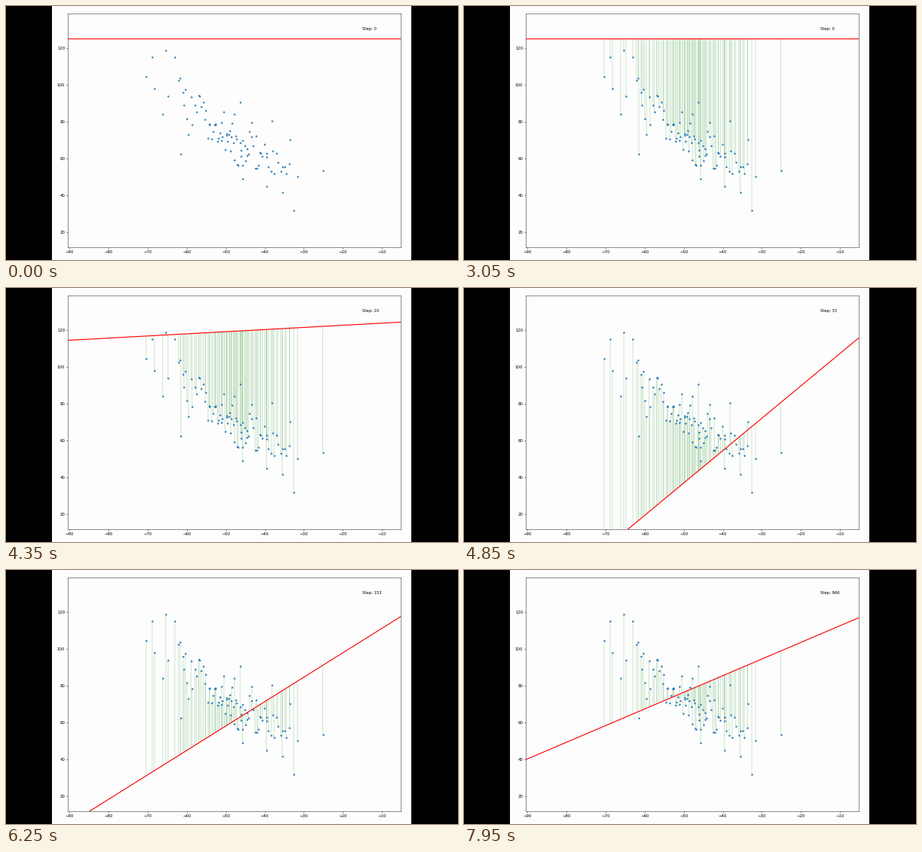
A matplotlib script for the animation above (8000 ms loop, 600 px wide and 338 px high).

```python
import numpy as np
import matplotlib.pyplot as plt
from matplotlib.animation import FuncAnimation
from matplotlib.collections import LineCollection
from matplotlib.patches import Rectangle

W, H, DPI = 600, 338, 100
FRAMES, INTERVAL = 160, 50
LEFT, RIGHT, TOP, BOTTOM = 82.1, 524.0, 10.2, 321.0
PX = 72 / DPI  # points per pixel

plt.rcParams["font.family"] = "DejaVu Sans"


def to_x(px):
    return -90 + (px - 84.2) / 5.186


def to_y(py):
    return 120 - (py - 56.0) / 2.446


def make_points(count=100):
    """A falling cloud, dense in the middle, with a few fixed outliers."""
    outliers = np.array([
        (212, 59), (194, 68.5), (224, 67.5), (186, 94), (197, 110),
        (215, 120.5), (208, 144), (238, 111), (232, 196.5), (311, 128.5),
        (353, 153.5), (314, 230), (345.5, 240), (366.5, 248), (382, 272),
        (387, 226.5), (376.5, 178.5), (420.5, 218.5),
    ])
    rng = np.random.default_rng(4)
    u = np.linspace(-1, 1, count - len(outliers))
    px = 302 + 48 * u + 26 * u ** 3 + rng.uniform(-1, 1, len(u))
    py = 173 + 0.62 * (px - 300) + np.clip(rng.normal(0, 18, len(u)), -34, 34)
    cloud = np.vstack([outliers, np.column_stack([px, py])])
    return to_x(cloud[:, 0]), to_y(cloud[:, 1])


# Gradient descent that overshoots on every step and slowly settles.
BEST, DECAY, START = 0.975, 0.9936, 125.0


def fit(step):
    drift = 0.0035 * step
    slope = BEST - 0.02 * drift - BEST * (-DECAY) ** step
    return slope, START - drift


KEY_TIMES = [3050, 3750, 4850, 5650, 6900, 7950]
KEY_STEPS = np.array([0, 8, 33, 77, 305, 966])


def step_at(t):
    """Step count: almost linear at first, then exponential."""
    return int(round(np.exp(np.interp(t, KEY_TIMES, np.log(KEY_STEPS + 20))) - 20))


xs, ys = make_points()

fig = plt.figure(figsize=(W / DPI, H / DPI), dpi=DPI, facecolor="black")
fig.add_artist(Rectangle((61 / W, 0), 477 / W, 1, color="#fdfdfd", lw=0, zorder=-5))
ax = fig.add_axes([LEFT / W, 1 - BOTTOM / H, (RIGHT - LEFT) / W, (BOTTOM - TOP) / H],
                  facecolor="#fdfdfd")
x_range = np.array([to_x(LEFT), to_x(RIGHT)])
ax.set_xlim(x_range)
ax.set_ylim(to_y(BOTTOM), to_y(TOP))
ax.set_xticks(range(-90, 0, 10))
ax.set_yticks(range(20, 121, 20))
ax.tick_params(labelsize=5.4 * PX, length=1.9 * PX, width=0.5 * PX, pad=1.9 * PX)
for spine in ax.spines.values():
    spine.set_linewidth(0.6 * PX)
    spine.set_edgecolor("#444444")

residuals = LineCollection([], colors="green", linewidths=0.8 * PX, zorder=1)
residuals.set_snap(False)
ax.add_collection(residuals, autolim=False)
ax.scatter(xs, ys, s=(2.4 * PX) ** 2, color="#1f77b4", linewidths=0, zorder=3)
line, = ax.plot([], [], color="red", lw=1.15 * PX, zorder=4, snap=False)
label = ax.text(to_x(473), to_y(31.7), "", fontsize=5.25 * PX)


def draw(frame):
    t = frame * INTERVAL
    step = step_at(t)
    slope, bias = fit(step)
    line.set_data(x_range, slope * x_range + bias)
    ends = slope * xs + bias
    residuals.set_segments([[(x, y), (x, e)] for x, y, e in zip(xs, ys, ends)])
    residuals.set_alpha(np.interp(t, [750, 2900], [0, 0.24]))
    label.set_text(f"Step: {step}")
    return line, residuals, label


anim = FuncAnimation(fig, draw, frames=FRAMES, interval=INTERVAL,
                     repeat=True, repeat_delay=0, blit=False)
plt.show()
```
